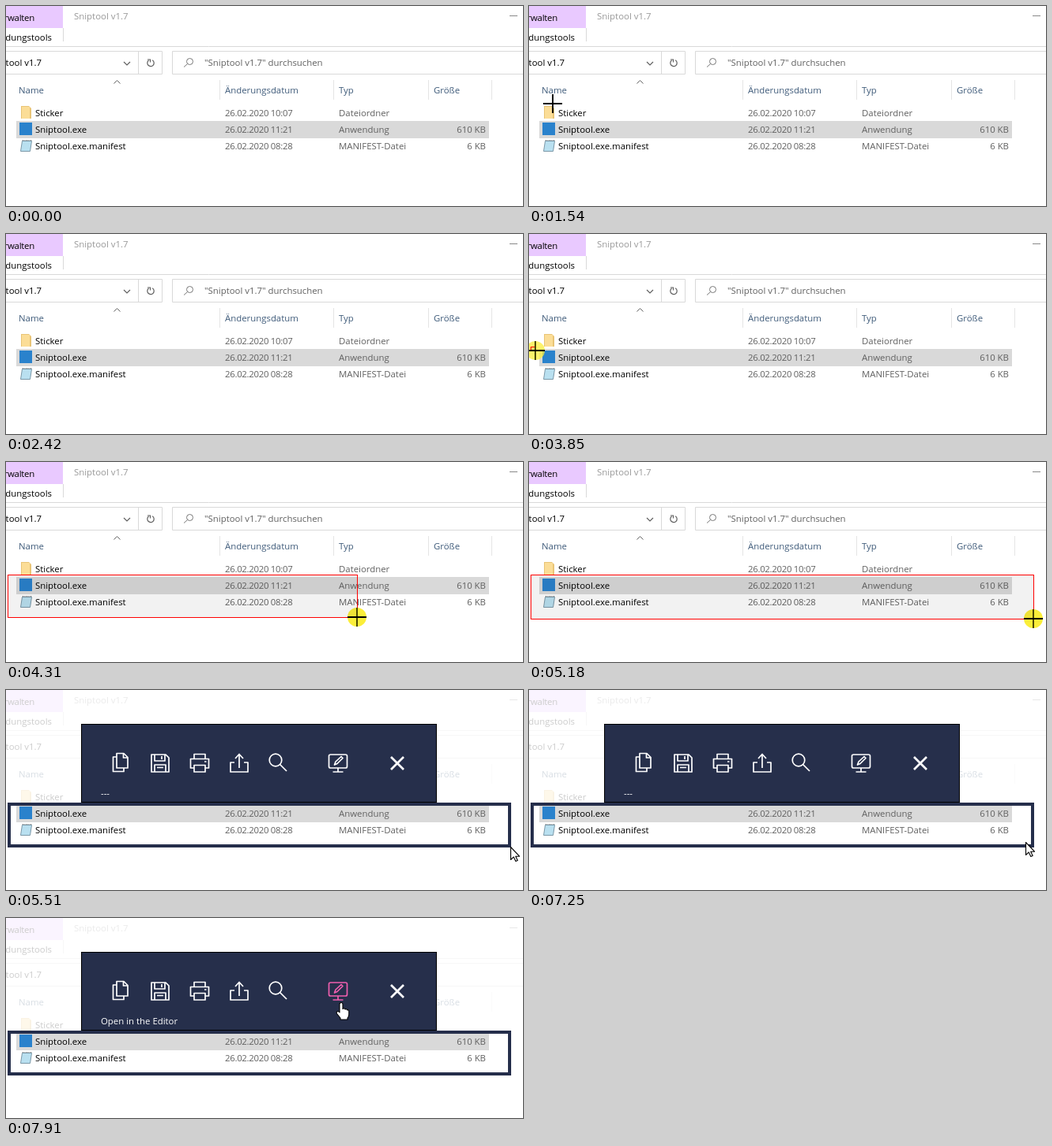
An HTML page for the animation above (8000 ms loop, 654x254 px).

```html
<!DOCTYPE html>
<html lang="de">
<head>
<meta charset="utf-8">
<title>Bildschirmausschnitt</title>
<style>
  html, body { margin: 0; width: 100%; height: 100%; overflow: hidden; background: #fff; }
  svg { display: block; width: 654px; height: 254px; }
  text { font: 11.4px "Open Sans", "Noto Sans", sans-serif; white-space: pre; fill: #606060; }
  .ink { fill: #000; }
  .head { fill: #3f5b7a; }
  .date { letter-spacing: -.3px; }
  .tight { letter-spacing: -.25px; }
  .end { text-anchor: end; }
  .line { fill: none; stroke: #d9d9d9; }
  .glyph { fill: none; stroke: #5f5f5f; stroke-width: 1.2; }
  #panel .icon { fill: none; stroke: #fff; stroke-width: 1.7; stroke-linejoin: round; }
  #panel text { fill: #fff; }
  #panel .icon.hot { stroke: #ee5fae; }
  .pointer { fill: #fff; stroke: #000; stroke-width: 1.1; stroke-linejoin: round; }
</style>
</head>
<body>
<svg viewBox="0 0 654 254">
  <!-- window frame and ribbon -->
  <path fill="#e9c9ff" d="M0 0H72V28H0Z"/>
  <path class="line" d="M72.5 28V45M0 51.5H654"/>
  <text class="ink end tight" x="36" y="19">Verwalten</text>
  <text class="ink end" x="58" y="44">Anwendungstools</text>
  <text x="86" y="17" style="fill:#999">Sniptool v1.7</text>
  <path stroke="#888" d="M637 12.5H647"/>

  <!-- address and search -->
  <path class="line" d="M-1 57.5H197.5V86.5H-1M167.5 58V86M655 57.5H210.5V86.5H655"/>
  <text class="ink end" x="45" y="76">Sniptool v1.7</text>
  <path class="glyph" d="M149 71L153 75L157 71"/>
  <path class="glyph" d="M185.2 68.8A4.2 4.2 0 1 1 180.500 69M179 68H182.500V71.500"/>
  <path class="glyph" style="stroke:#777;stroke-width:1" d="M229.500 73.500L225 77.500"/>
  <circle class="glyph" style="stroke:#777;stroke-width:1" cx="232.500" cy="70.500" r="4"/>
  <text x="251" y="76">"Sniptool v1.7" durchsuchen</text>

  <!-- column heads -->
  <path class="glyph" style="stroke-width:1" d="M136.500 98.500L140.500 94.500L144.500 98.500"/>
  <path class="line" style="stroke:#e5e5e5" d="M270.5 94V119M414.5 94V119M534.5 94V119M614.5 94V119"/>
  <text class="head" x="16" y="111">Name</text>
  <text class="head" x="277" y="111">Änderungsdatum</text>
  <text class="head" x="421" y="111">Typ</text>
  <text class="head" x="541" y="111">Größe</text>

  <!-- files -->
  <path fill="#d9d9d9" d="M13 146H611V168H13Z"/>
  <g id="rows"></g>
  <path fill="#e9c476" d="M19 127H29L32 130V143H19Z"/>
  <path fill="#fbdd97" d="M20 128H30V143H20Z"/>
  <path fill="#2a82cc" d="M17 148H33V164H17Z"/>
  <path fill="#b9e0f0" stroke="#7b98a8" d="M20.500 171.500H32.500L30.500 184.500H18.500Z"/>
  <path stroke="#666" stroke-dasharray="1 1.5" d="M21 170.500H33"/>

  <!-- selection being dragged -->
  <circle id="press" r="12" fill="#fbee3a"/>
  <rect id="drag" x="2.5" y="143.5" fill="#000" fill-opacity=".05" stroke="#f00"/>

  <!-- result view -->
  <g id="result">
    <path fill="#fff" fill-opacity=".8" fill-rule="evenodd" d="M0 0H654V254H0ZM2 143V200H639V143Z"/>
    <rect x="4" y="145" width="633" height="53" fill="none" stroke="#252e4b" stroke-width="4"/>
    <g id="panel">
      <rect x="95.5" y="43.5" width="449" height="99" fill="#262f4b" stroke="#000"/>
      <path class="icon" d="M140 80.5H149L154 85.5V99H140ZM148.5 81V86H154M140 85H135.5V103.5H149V99"/>
      <path class="icon" d="M184 82H202L206 86V104H184ZM188 82V90H201V82M197 84V88M188 104V95H202V104M191 98.5H199"/>
      <path class="icon" d="M238 87V81.5H252V87M238 99H233.5V87.5H256.5V99H252M238 95.5H252V104H238ZM251 91H253.5"/>
      <path class="icon" d="M289 92H284V104H306V92H301M295 99V82M290 87L295 81.5L300 87"/>
      <path class="icon" d="M346.5 94.5L355 103"/>
      <circle class="icon" cx="341" cy="89" r="7.8"/>
      <path id="editor" class="icon" d="M410.5 82H429.5Q431.5 82 431.5 84V97Q431.5 99 429.5 99H410.5Q408.5 99 408.5 97V84Q408.5 82 410.5 82ZM420 99V103.5M413.5 104H426.5M415.5 95L417 91L424 84.5L426 86.5L419 93.5Z"/>
      <path class="icon" style="stroke-width:2.7" d="M487 85L503 101M503 85L487 101"/>
      <text id="hint" x="120" y="135">---</text>
    </g>
  </g>

  <!-- pointers -->
  <g id="cross" stroke-width="2">
    <path id="upright" d="M0-12V12"/>
    <path d="M-12 0H12" stroke="#000"/>
  </g>
  <path id="arrow" class="pointer" d="M.5 .5V16.5L4.2 13L6.8 18.5L9.2 17.5L6.7 12.2H11.5Z"/>
  <path id="hand" class="pointer" d="M-2 13V2.5A2 2 0 0 1 2 2.5V8.5Q3.8 6.8 5 9Q6.8 7.8 7.8 10Q9.8 9.5 9.8 11.5V15.5Q9.8 18 8 20V22H-1V20L-5.5 14.5Q-6.5 12 -4.5 11.5Q-3.2 11.5 -2 13Z"/>
</svg>
<script>
  const LOOP = 8000, PRESS = 3850, SNIP = 5510, HOVER = 7690;
  const $ = id => document.getElementById(id);
  const show = (id, on) => { $(id).style.display = on ? '' : 'none'; };

  const files = [
    ['Sticker', '26.02.2020 10:07', 'Dateiordner', ''],
    ['Sniptool.exe', '26.02.2020 11:21', 'Anwendung', '610 KB'],
    ['Sniptool.exe.manifest', '26.02.2020 08:28', 'MANIFEST-Datei', '6 KB']
  ];
  $('rows').innerHTML = files.map(([name, date, type, size], i) => {
    const y = 140 + 21 * i;
    return `<text class="ink" x="37" y="${y}">${name}</text>
      <text class="date" x="277" y="${y}">${date}</text>
      <text x="421" y="${y}">${type}</text>
      <text class="end" x="607" y="${y}">${size}</text>`;
  }).join('');

  // Each axis eases out with its own power, which bends the path; the screen refreshes in steps.
  const leg = (start, end, steps, from, to, power = [1, 1]) => ({ start, end, steps, from, to, power });
  const rest = (start, at) => leg(start, start + 1, 1, at, at);
  const legs = [
    rest(0, [-50, 96]),
    leg(1080, 1860, 7, [169, 231], [18, 96], [3, 1.86]),
    leg(1980, 2420, 4, [15, 99], [-20, 115]),
    leg(2850, 3530, 6, [-11, 130], [2, 143]),
    leg(PRESS, 4630, 7, [8, 148], [625, 199], [1.45, 3.8]),
    rest(4750, [645, 199]),
    leg(5080, 5180, 1, [642, 199], [638, 199]),
    leg(7250, HOVER, 4, [628, 193], [433, 107]),
    rest(7910, [424, 107])
  ];

  function pointerAt(t) {
    const { start, end, steps, from, to, power } = legs.filter(l => l.start <= t).pop();
    const part = Math.min(1, (t - start) / (end - start));
    const p = Math.floor(part * steps + 1e-6) / steps;
    return from.map((a, i) => Math.round(a + (to[i] - a) * (1 - (1 - p) ** power[i])));
  }

  function draw(t) {
    const [x, y] = pointerAt(t);
    const done = t >= SNIP, hot = t >= HOVER, pressed = t >= PRESS && !done;

    show('cross', !done);
    show('press', pressed);
    show('drag', pressed);
    show('result', done);
    show('arrow', done && !hot);
    show('hand', hot);
    for (const id of ['press', 'cross', 'arrow', 'hand']) $(id).setAttribute('transform', `translate(${x} ${y})`);

    $('press').setAttribute('opacity', Math.min(1, .75 + (t - PRESS) / 1500));
    $('upright').setAttribute('stroke', pressed ? '#4d4a00' : '#000');
    $('drag').setAttribute('width', Math.max(0, x - 2));
    $('drag').setAttribute('height', Math.max(0, y - 143));
    $('editor').classList.toggle('hot', hot);
    $('hint').textContent = hot ? 'Open in the Editor' : '---';
  }

  const begin = performance.now();
  function tick() {
    draw((performance.now() - begin) % LOOP);
    requestAnimationFrame(tick);
  }
  tick();
</script>
</body>
</html>
```
